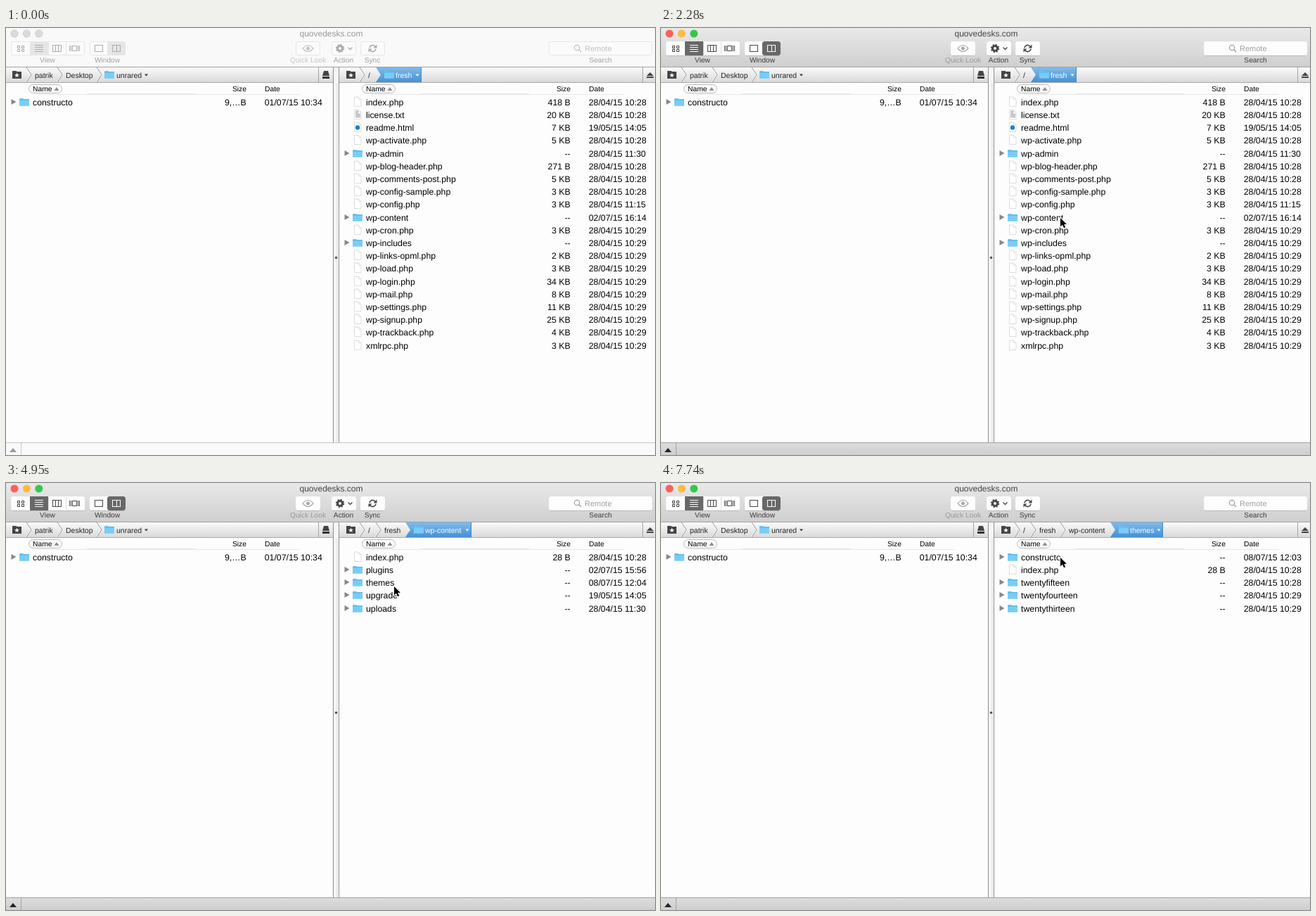
Write an HTML page with a canvas that moves like this. It is 923 by 607 pixels and loops after 8 s.

```html
<!DOCTYPE html>
<html lang="en">
<head>
<meta charset="utf-8">
<title>File transfer window</title>
<style>
  html, body { margin: 0; width: 100%; height: 100%; overflow: hidden; background: #fff; }
  canvas { display: block; width: 923px; height: 607px; }
</style>
</head>
<body>
<canvas id="stage" width="923" height="607"></canvas>
<script>
const W = 923, H = 607, LOOP = 8000;
const ctx = document.getElementById('stage').getContext('2d');
const FONT = '"Liberation Sans", Arial, sans-serif';

// Each row: name | size | date; a size of "--" marks a folder.
const parse = text => text.trim().split('\n').map(row => row.trim().split('|'));
const localRows = parse('constructo|9,…B|01/07/15 10:34');
const listings = [
  { path: ['/', 'fresh'], end: 591, rows: parse(`
    index.php|418 B|28/04/15 10:28
    license.txt|20 KB|28/04/15 10:28
    readme.html|7 KB|19/05/15 14:05
    wp-activate.php|5 KB|28/04/15 10:28
    wp-admin|--|28/04/15 11:30
    wp-blog-header.php|271 B|28/04/15 10:28
    wp-comments-post.php|5 KB|28/04/15 10:28
    wp-config-sample.php|3 KB|28/04/15 10:28
    wp-config.php|3 KB|28/04/15 11:15
    wp-content|--|02/07/15 16:14
    wp-cron.php|3 KB|28/04/15 10:29
    wp-includes|--|28/04/15 10:29
    wp-links-opml.php|2 KB|28/04/15 10:29
    wp-load.php|3 KB|28/04/15 10:29
    wp-login.php|34 KB|28/04/15 10:29
    wp-mail.php|8 KB|28/04/15 10:29
    wp-settings.php|11 KB|28/04/15 10:29
    wp-signup.php|25 KB|28/04/15 10:29
    wp-trackback.php|4 KB|28/04/15 10:29
    xmlrpc.php|3 KB|28/04/15 10:29`) },
  { path: ['/', 'fresh', 'wp-content'], end: 662, rows: parse(`
    index.php|28 B|28/04/15 10:28
    plugins|--|02/07/15 15:56
    themes|--|08/07/15 12:04
    upgrade|--|19/05/15 14:05
    uploads|--|28/04/15 11:30`) },
  { path: ['/', 'fresh', 'wp-content', 'themes'], end: 714, rows: parse(`
    constructo|--|08/07/15 12:03
    index.php|28 B|28/04/15 10:28
    twentyfifteen|--|28/04/15 10:28
    twentyfourteen|--|28/04/15 10:29
    twentythirteen|--|28/04/15 10:29`) }
];
const crumbX = [515, 538, 580, 651];

// Pointer moves: start, end, steps, target x and y, easing, sideways bend
const easeIn = p => p ** 1.25;
const easeOut = p => 1 - (1 - p) ** 1.8;
const smooth = p => p * p * (3 - 2 * p);
const moves = [
  [500, 1290, 10, 596, 324, easeIn, 1.4],
  [1380, 1830, 6, 568, 270, easeOut],
  [2600, 2690, 2, 566, 270, smooth],
  [3140, 3230, 2, 565, 270, smooth],
  [3500, 3590, 2, 564, 270, smooth],
  [4400, 4950, 7, 552, 147, smooth],
  [5130, 5480, 5, 547, 142, easeOut],
  [6740, 7380, 8, 568, 107, smooth],
  [7740, 7740, 1, 568, 106, smooth]
];

function pointerAt(t) {
  let x = 663, y = 599;
  for (const [from, to, steps, tx, ty, ease, bend = 1] of moves) {
    if (t < from) break;
    const step = to > from ? Math.floor((t - from) / (to - from) * (steps - 1)) + 1 : 1;
    const p = ease(Math.min(1, step / steps));
    x += (tx - x) * p ** bend;
    y += (ty - y) * p;
  }
  return [Math.round(x), Math.round(y)];
}

// Drawing helpers
function text(str, x, y, size, color, align = 'left') {
  ctx.font = `${size}px ${FONT}`;
  ctx.textAlign = align;
  ctx.fillStyle = color;
  ctx.fillText(str, x, y);
}
function rect(x, y, w, h, color) {
  ctx.fillStyle = color;
  ctx.fillRect(x, y, w, h);
}
function frame(x, y, w, h, color) {
  ctx.strokeStyle = color;
  ctx.lineWidth = 1;
  ctx.strokeRect(x + .5, y + .5, w - 1, h - 1);
}
function rounded(x, y, w, h, r, fill, stroke) {
  ctx.beginPath();
  ctx.roundRect(x + .5, y + .5, w - 1, h - 1, r);
  ctx.fillStyle = fill;
  ctx.fill();
  ctx.strokeStyle = stroke;
  ctx.lineWidth = 1;
  ctx.stroke();
}
function trace(points) {
  ctx.beginPath();
  points.forEach(([x, y]) => ctx.lineTo(x, y));
}
function poly(color, ...points) {
  trace(points);
  ctx.fillStyle = color;
  ctx.fill();
}
function line(color, width, ...points) {
  trace(points);
  ctx.strokeStyle = color;
  ctx.lineWidth = width;
  ctx.stroke();
}
function arc(x, y, r, color, width, from = 0, to = 7) {
  ctx.beginPath();
  ctx.arc(x, y, r, from, Math.min(to, from + 2 * Math.PI));
  if (width) {
    ctx.strokeStyle = color;
    ctx.lineWidth = width;
    ctx.stroke();
  } else {
    ctx.fillStyle = color;
    ctx.fill();
  }
}
function vertical(y0, y1, top, bottom) {
  const g = ctx.createLinearGradient(0, y0, 0, y1);
  g.addColorStop(0, top);
  g.addColorStop(1, bottom);
  return g;
}

function folder(x, y) {
  rect(x + .5, y - 6, 5, 2, '#6cc3ef');
  rect(x, y - 5, 14, 9.5, '#62c0ef');
  rect(x, y - 3, 14, 7.5, '#78cdf8');
}
function page(x, y, name) {
  poly('#fff', [x, y - 7], [x + 7, y - 7], [x + 10, y - 4], [x + 10, y + 6], [x, y + 6]);
  line('#dcdcdc', 1, [x + .5, y - 7], [x + 7, y - 6.5], [x + 10, y - 3.5], [x + 10, y + 6.5],
    [x + .5, y + 6.5], [x + .5, y - 7]);
  line('#e0e0e0', 1, [x + 6.5, y - 6.5], [x + 6.5, y - 3.5], [x + 10, y - 3.5]);
  if (name.endsWith('.txt'))
    for (let i = 0; i < 5; i++) rect(x + 2, y - 5 + i * 2, i < 2 ? 4 : 7, 1, '#929292');
  if (name.endsWith('.html')) arc(x + 5, y + .5, 3.2, '#1c80cd');
}
function placesIcon(x) {
  rect(x, 61, 6, 3, '#444');
  rect(x, 62, 13, 10, '#444');
  const star = Array.from({ length: 10 }, (_, i) => {
    const a = i * Math.PI / 5 - Math.PI / 2, r = i % 2 ? 1.5 : 3.6;
    return [x + 6.5 + r * Math.cos(a), 67.2 + r * Math.sin(a)];
  });
  poly('#fff', ...star);
}
function dropArrow(x, color) {
  poly(color, [x - 2.5, 65.5], [x + 2.5, 65.5], [x, 68.5]);
}
function chevron(x) {
  line('#fff', 1, [x - 1, 56], [x + 6, 66.5], [x - 1, 77]);
  line('#969696', 1, [x, 56], [x + 7, 66.5], [x, 77]);
}

function toolbar(active) {
  const ink = active ? '#484848' : '#acacac';
  const label = active ? '#3c3c3c' : '#a2a2a2';
  const face = active ? '#fdfdfd' : '#fbfbfb';
  const edge = active ? '#fafafa' : '#e6e6e6';
  const split = active ? '#dcdcdc' : '#e6e6e6';
  const chosen = active ? '#686868' : '#e6e6e6';
  const chosenInk = active ? '#fff' : '#acacac';
  const eye = active ? '#a9a9a9' : '#c2c2c2';
  const hint = active ? '#a0a0a0' : '#c0c0c0';
  rect(0, 0, W, 55, active ? vertical(0, 55, '#e9e9e9', '#cfcfcf') : '#f9f9f9');

  ['#fc605b', '#fdbc40', '#34c84a'].forEach((c, i) => {
    arc(12 + i * 17.4, 8, 5.5, active ? c : '#dadada');
    if (!active) arc(12 + i * 17.4, 8, 5.2, '#d0d0d0', .7);
  });
  text('quovedesks.com', 462.5, 12, 12, active ? '#444' : '#999', 'center');

  const button = (x, w) => {
    if (active) rect(x + 2, 39, w - 4, 1, '#bababa');
    rounded(x, 19, w, 20, 2.5, face, edge);
  };
  button(7, 105);
  button(119, 51);
  button(412, 35);
  button(463, 35);
  button(504, 35);
  button(772, 147);
  rect(60, 20, 1, 18, split);
  rect(85, 20, 1, 18, split);
  rect(34, 19, 26, 20, chosen);
  rounded(144, 19, 26, 20, 2.5, chosen, chosen);

  for (const x of [16, 22]) for (const y of [25, 30]) frame(x, y, 4, 4, ink);
  for (let i = 0; i < 4; i++) rect(41, 24 + i * 3, 12, 1, chosenInk);
  frame(66, 24, 13, 10, ink);
  rect(70, 24, 1, 10, ink);
  rect(74, 24, 1, 10, ink);
  for (const x of [90, 92, 102, 104]) rect(x, 25, 1, 8, ink);
  frame(94, 25, 7, 8, ink);
  frame(126, 24, 12, 10, ink);
  frame(151, 24, 12, 10, chosenInk);
  rect(157, 24, 1, 10, chosenInk);

  // Eye
  ctx.beginPath();
  ctx.moveTo(422, 29);
  ctx.quadraticCurveTo(429.5, 20, 437, 29);
  ctx.quadraticCurveTo(429.5, 38, 422, 29);
  ctx.strokeStyle = eye;
  ctx.lineWidth = 1.2;
  ctx.stroke();
  arc(429.5, 29, 2.5, eye);

  // Gear
  arc(475, 29, 3.5, ink, 3);
  ctx.setLineDash([2, 1.93]);
  arc(475, 29, 5, ink, 2.4);
  ctx.setLineDash([]);
  line(ink, 1.3, [486.5, 27.5], [489.5, 30.5], [492.5, 27.5]);

  // Sync
  arc(521.5, 29, 4.6, ink, 1.6, 3.3, 5.8);
  arc(521.5, 29, 4.6, ink, 1.6, .15, 2.65);
  poly(ink, [527.5, 23.5], [527.5, 28.5], [522.5, 28.5]);
  poly(ink, [515.5, 34.5], [515.5, 29.5], [520.5, 29.5]);

  // Search field
  arc(812, 28, 3.7, hint, 1.2);
  line(hint, 1.3, [814.7, 30.7], [818, 34]);
  text('Remote', 823, 33, 11, hint);

  text('View', 59, 48.5, 10.2, label, 'center');
  text('Window', 144, 48.5, 10.2, label, 'center');
  text('Quick Look', 429.5, 48.5, 10.2, active ? '#999' : '#c4c4c4', 'center');
  text('Action', 480, 48.5, 10.2, label, 'center');
  text('Sync', 521, 48.5, 10.2, label, 'center');
  text('Search', 845.5, 48.5, 10.2, label, 'center');
}

function pathBars({ path, end }) {
  rect(0, 55, W, 1, '#a3a3a3');
  rect(0, 56, W, 21, vertical(56, 77, '#fafafa', '#dadada'));
  rect(0, 77, W, 1, '#a9a9a9');

  placesIcon(9);
  [29, 73, 129].forEach(chevron);
  text('patrik', 41, 70.5, 10.5, '#222');
  text('Desktop', 85, 70.5, 10.5, '#222');
  folder(140, 67);
  text('unrared', 157, 70.5, 10.5, '#222');
  dropArrow(199.5, '#333');
  rect(444, 56, 1, 21, '#a3a3a3');
  poly('#444', [452, 61], [458, 61], [460, 68], [450, 68]);
  rect(450, 69, 10, 3, '#333');

  placesIcon(484);
  path.forEach((name, i) => {
    const x = crumbX[i], start = x - 12;
    if (i < path.length - 1) {
      chevron(start);
      text(name, x, 70.5, 10.5, '#222');
      return;
    }
    poly(vertical(56, 77, '#7fbbec', '#4690d5'),
      [start, 56], [end, 56], [end, 77], [start, 77], [start + 7, 66.5]);
    rect(end - 1, 56, 1, 21, '#3f86c8');
    folder(x, 67);
    text(name, x + 16, 70.5, 10.5, '#fff');
    dropArrow(end - 6, '#fff');
  });
  rect(905, 56, 1, 21, '#a3a3a3');
  poly('#444', [911, 68], [916, 63], [921, 68]);
  rect(911, 69, 10, 2, '#444');
}

// nameX shifts the name column, dataX the size and date columns.
function pane(rows, nameX, dataX, selected) {
  rect(nameX + 45, 94, dataX + 373 - nameX, 1, '#e6e6e6');
  rect(nameX + 115, 93, 155, 1, '#e9e9e9');
  rounded(nameX + 32, 80, 48, 13, 6.5, '#fbfbfb', '#b9b9b9');
  text('Name', nameX + 38, 90, 10.3, '#000');
  poly('#8d8d8d', [nameX + 68.5, 89], [nameX + 75.5, 89], [nameX + 72, 84]);
  text('Size', dataX + 342, 90, 10.3, '#000', 'right');
  text('Date', dataX + 368, 90, 10.3, '#000');

  rows.forEach(([name, size, date], i) => {
    const mid = Math.round(105.7 + i * 18.2), base = mid + 4;
    const on = i === selected;
    const ink = on ? '#fff' : '#000';
    if (on) {
      const top = Math.floor(96.7 + i * 18.2);
      rect(474, top, W - 474, Math.round(114 + i * 18.2) - top, '#0068da');
    }
    if (name.includes('.')) {
      page(nameX + 21, mid - 1, name);
    } else {
      poly(on ? '#fff' : '#878787',
        [nameX + 7.5, mid - 5], [nameX + 14.5, mid - 1], [nameX + 7.5, mid + 3]);
      folder(nameX + 19, mid);
    }
    text(name, nameX + 38, base, 12.3, ink);
    text(size, dataX + 341.7, base, 12.3, ink, 'right');
    text(date, dataX + 367.7, base, 12.3, ink);
  });
}

function divider() {
  rect(466, 56, 8, 534, '#f6f6f6');
  rect(470, 78, 2, 511, '#e8e8e8');
  rect(465, 56, 1, 534, '#8e8e8e');
  rect(473, 56, 1, 534, '#8e8e8e');
  arc(469.5, 326.5, 1.8, '#555');
}

function statusBar(active) {
  rect(0, 590, W, 17, active ? vertical(590, 607, '#dcdcdc', '#cfcfcf') : '#f9f9f9');
  rect(0, 589, W, 1, active ? '#a0a0a0' : '#c4c4c4');
  rect(21, 590, 1, 17, active ? '#a0a0a0' : '#c8c8c8');
  poly(active ? '#222' : '#999', [5, 603], [15, 603], [10, 597]);
}

function pointer([x, y]) {
  ctx.save();
  ctx.translate(x, y);
  trace([[0, 0], [0, 12.5], [3, 9.8], [5, 14.3], [7.2, 13.4], [5.2, 9], [9, 9]]);
  ctx.closePath();
  ctx.lineJoin = 'round';
  ctx.strokeStyle = '#fff';
  ctx.lineWidth = 2;
  ctx.stroke();
  ctx.fillStyle = '#000';
  ctx.fill();
  ctx.restore();
}

function draw(t) {
  const active = t >= 2280;
  const listing = listings[t < 4040 ? 0 : t < 6380 ? 1 : 2];
  const selected = t >= 2960 && t < 4040 ? 9 : t >= 6200 && t < 6380 ? 2 : -1;
  rect(0, 0, W, H, '#fdfdfd');
  toolbar(active);
  pathBars(listing);
  pane(localRows, 0, 0, -1);
  pane(listing.rows, 474, 461, selected);
  divider();
  statusBar(active);
  if (t >= 350) pointer(pointerAt(t));
}

ctx.textRendering = 'geometricPrecision';
const begin = performance.now();
(function tick() {
  draw((performance.now() - begin) % LOOP);
  requestAnimationFrame(tick);
})();
</script>
</body>
</html>
```
